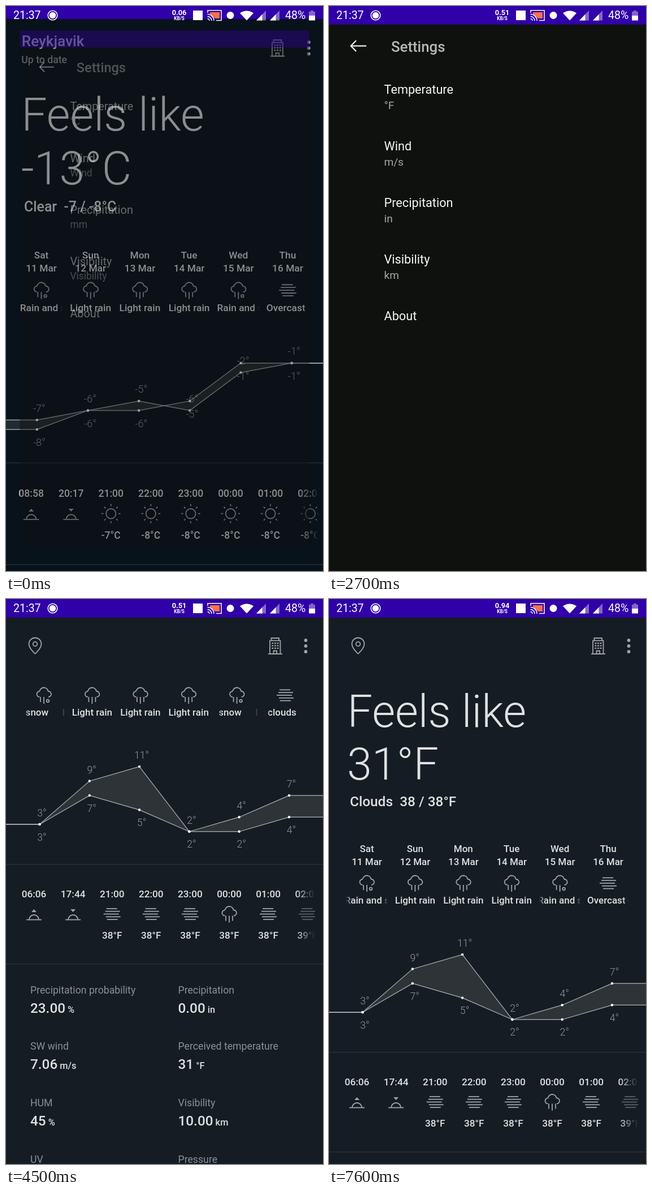
An HTML page with a canvas for the animation above (7700 ms loop, 561 by 998 pixels).

```html
<!DOCTYPE html>
<html lang="en">
<head>
<meta charset="utf-8">
<title>Weather settings</title>
<style>
html, body { margin: 0; width: 100%; height: 100%; overflow: hidden; background: #151c23; }
canvas { display: block; width: 561px; height: 998px; }
</style>
</head>
<body>
<canvas id="stage"></canvas>
<script>
const W = 561, H = 998, LOOP = 7700, STEP = 100, BAR = 32.75;
const CLOSE = 2900, MARQUEE_START = 2770, MARQUEE_SPEED = 0.038, MARQUEE_PAUSE = 1200;
const FONT = 'Roboto, "Open Sans", sans-serif';
const BRIGHT = '#dfe1e1', SOFT = '#8b9093', ICON = '#a0a4a6', PURPLE = '#3000a8';
const TAU = Math.PI * 2;

const canvas = document.getElementById('stage');
const dpr = window.devicePixelRatio || 1;
canvas.width = W * dpr;
canvas.height = H * dpr;
const c = canvas.getContext('2d');

const scrollKeys = [[3700, 0], [4400, 332], [4600, 332], [4800, 391], [6500, 391], [7200, 0]];
const glowKeys = [[4800, 0], [5200, 1], [5700, 1], [5900, 0.86], [6400, 0]];
const speedKeys = [[0, '0.06'], [1500, '0.63'], [2700, '0.51'], [5200, '0.94']];

// Each row: title, value before, value after, press time, change time
const prefs = [
  ['Temperature', '°C', '°F', 400, 700],
  ['Wind', 'Wind', 'm/s', 1200, 1500],
  ['Precipitation', 'mm', 'in', 1800, 2100],
  ['Visibility', 'Visibility', 'km', 2300, 2600],
  ['About']
];

const days = [
  ['Sat', 'snow', 'Rain and snow'], ['Sun', 'rain', 'Light rain'], ['Mon', 'rain', 'Light rain'],
  ['Tue', 'rain', 'Light rain'], ['Wed', 'snow', 'Rain and snow'], ['Thu', 'fog', 'Overcast clouds']
];

const before = {
  bg: '#08121b', city: 'Reykjavik', feels: '-13°C', sky: 'Clear', range: '-7 / -8°C',
  high: [-7, -6, -5, -6, -2, -1], low: [-8, -6, -6, -5, -1, -1],
  sun: ['08:58', '20:17'],
  icons: ['sun', 'sun', 'sun', 'sun', 'sun', 'sun'],
  temps: ['-7°C', '-8°C', '-8°C', '-8°C', '-8°C', '-8°C']
};
const after = {
  bg: '#151c23', feels: '31°F', sky: 'Clouds', range: '38 / 38°F',
  high: [3, 9, 11, 2, 4, 7], low: [3, 7, 5, 2, 2, 4],
  sun: ['06:06', '17:44'],
  icons: ['fog', 'fog', 'fog', 'rain', 'fog', 'fog'],
  temps: ['38°F', '38°F', '38°F', '38°F', '38°F', '39°F']
};
const hours = ['21:00', '22:00', '23:00', '00:00', '01:00', '02:00'];
const details = [
  ['Precipitation probability', '23.00', '%'], ['Precipitation', '0.00', 'in'],
  ['SW wind', '7.06', 'm/s'], ['Perceived temperature', '31', '°F'],
  ['HUM', '45', '%'], ['Visibility', '10.00', 'km'],
  ['UV', '2.03', ''], ['Pressure', '1015.00', 'hPa']
];

function tween(keys, t) {
  if (t <= keys[0][0]) return keys[0][1];
  for (let i = 1; i < keys.length; i++) {
    const [t0, a] = keys[i - 1], [t1, b] = keys[i];
    if (t < t1) {
      const p = (t - t0) / (t1 - t0);
      return a + (b - a) * p * p * (3 - 2 * p);
    }
  }
  return keys[keys.length - 1][1];
}

function text(str, x, y, size, weight, color, align = 'left') {
  c.font = `${weight} ${size}px ${FONT}`;
  c.textAlign = align;
  c.fillStyle = color;
  c.fillText(str, x, y);
}

function line(...p) {
  c.beginPath();
  for (let i = 0; i < p.length; i += 2) c.lineTo(p[i], p[i + 1]);
  c.stroke();
}

function shape(color, ...p) {
  c.fillStyle = color;
  c.beginPath();
  for (let i = 0; i < p.length; i += 2) c.lineTo(p[i], p[i + 1]);
  c.fill();
}

function rect(color, x, y, w, h) {
  c.fillStyle = color;
  c.fillRect(x, y, w, h);
}

function circle(x, y, r, color) {
  c.beginPath();
  c.arc(x, y, r, 0, TAU);
  if (color) { c.fillStyle = color; c.fill(); } else c.stroke();
}

function pen(color, width) {
  c.strokeStyle = color;
  c.lineWidth = width;
}

function fade(x0, x1, stops) {
  const g = c.createLinearGradient(x0, 0, x1, 0);
  stops.forEach(([p, a]) => g.addColorStop(p, `rgba(223,225,225,${a})`));
  return g;
}

function scaled(s, alpha, draw) {
  c.save();
  c.globalAlpha = alpha;
  c.translate(W / 2, H / 2);
  c.scale(s, s);
  c.translate(-W / 2, -H / 2);
  draw();
  c.restore();
}

const icons = {
  cloud() {
    c.beginPath();
    c.arc(-7.5, -2, 5, Math.PI / 2, 4.6);
    c.arc(0, -6, 7.5, 3.5, -0.2);
    c.arc(8, -2, 5, -1.5, Math.PI / 2);
    c.stroke();
    line(-6, 3, -6, 12);
    line(0, 3, 0, 15);
  },
  rain() {
    icons.cloud();
    line(6, 3, 6, 12);
  },
  snow() {
    icons.cloud();
    circle(7, 10, 2.3);
  },
  fog() {
    [[-10, 9], [-12, 14], [-15, 12], [-11, 15], [-9, 10]].forEach(([a, b], i) => {
      const y = (i - 2) * 4.8;
      line(a, y, b, y);
    });
  },
  sun() {
    circle(0, 0, 8.5);
    for (let i = 0; i < 8; i++) {
      const x = Math.cos(i * TAU / 8), y = Math.sin(i * TAU / 8);
      line(x * 13, y * 13, x * 16.5, y * 16.5);
    }
  },
  horizon(dir) {
    line(-13.5, 10, 13.5, 10);
    c.beginPath();
    c.arc(0, 10, 8.5, Math.PI, 0);
    c.stroke();
    shape(c.strokeStyle, -4.5, -6 + dir * 2.5, 4.5, -6 + dir * 2.5, 0, -6 - dir * 2.5);
  },
  rise() { icons.horizon(1); },
  set() { icons.horizon(-1); }
};

function icon(name, x, y, alpha = 1) {
  c.save();
  c.globalAlpha *= alpha;
  c.translate(x, y);
  pen(ICON, 1.8);
  icons[name]();
  c.restore();
}

function marquee(str, cx, y, t) {
  const width = 74, left = cx - width / 2;
  c.font = `500 17px ${FONT}`;
  const len = c.measureText(str).width;
  if (len < width + 3) return text(str, cx, y, 17, 500, BRIGHT, 'center');
  const period = len + width / 3;
  const run = period / MARQUEE_SPEED;
  const phase = t < MARQUEE_START ? run : (t - MARQUEE_START) % (run + MARQUEE_PAUSE);
  const shift = phase < run ? phase * MARQUEE_SPEED : 0;
  const paint = fade(left, left + width, [[0, shift ? 0 : 1], [0.14, 1], [0.86, 1], [1, 0]]);
  c.save();
  c.beginPath();
  c.rect(left, y - 20, width, 30);
  c.clip();
  text(str, left - shift, y, 17, 500, paint);
  text(str, left - shift + period, y, 17, 500, paint);
  c.restore();
}

function chart(data) {
  const all = [...data.high, ...data.low];
  const top = Math.max(...all), unit = 114.8 / (top - Math.min(...all));
  const px = i => 59.5 + i * 88.3;
  const py = v => 628 + (top - v) * unit;
  const path = vals => {
    const pts = [-40, py(vals[0])];
    vals.forEach((v, i) => pts.push(px(i), py(v)));
    return [...pts, W + 40, py(vals[5])];
  };
  const low = path(data.low), back = [];
  for (let i = low.length - 2; i >= 0; i -= 2) back.push(low[i], low[i + 1]);
  shape('rgba(255,250,220,0.1)', ...path(data.high), ...back);
  pen('rgba(190,193,194,0.78)', 1.4);
  line(...path(data.high));
  line(...low);
  [[data.high, -14], [data.low, 28.5]].forEach(([vals, dy]) => vals.forEach((v, i) => {
    circle(px(i), py(v), 2.2, '#fff');
    text(v + '°', px(i) + 4, py(v) + dy, 17.7, 300, '#94999b', 'center');
  }));
}

function hourly(data) {
  const paint = fade(512, 547, [[0, 1], [1, 0]]);
  const times = [...data.sun, ...hours];
  const marks = ['rise', 'set', ...data.icons];
  c.save();
  c.beginPath();
  c.rect(0, 830, 547, 120);
  c.clip();
  times.forEach((time, i) => {
    const x = 49.5 + i * 69.1;
    text(time, x, 859, 17.2, 500, paint, 'center');
    icon(marks[i], x, 888.5, i === 7 ? 0.5 : 1);
    if (i > 1) text(data.temps[i - 2], x, 932, 17.2, 500, paint, 'center');
  });
  c.restore();
}

function detailGrid() {
  details.forEach(([label, value, unit], i) => {
    const x = i % 2 ? 304.5 : 43;
    const y = 1028.5 + (i >> 1) * 99.8;
    text(label, x, y, 17.7, 400, SOFT);
    text(value, x, y + 34, 24.3, 500, BRIGHT);
    text(' ' + unit, x + c.measureText(value).width, y + 34, 16.4, 500, BRIGHT);
  });
}

function header(data) {
  pen(ICON, 1.8);
  if (data.city) {
    text(data.city, 33, 80, 25.7, 500, BRIGHT);
    text('Up to date', 32.5, 109, 17.3, 500, SOFT);
  } else {
    c.beginPath();
    c.moveTo(51.5, 97);
    c.bezierCurveTo(45, 90, 40.5, 85, 40.5, 79.5);
    c.arc(51.5, 79.5, 11, Math.PI, 0);
    c.bezierCurveTo(62.5, 85, 58, 90, 51.5, 97);
    c.stroke();
    circle(51.5, 79.5, 3.8);
  }
  c.strokeRect(467, 73.5, 18.5, 23.5);
  line(469.5, 73, 469.5, 69, 483, 69, 483, 73);
  line(464, 97, 489, 97);
  line(473.5, 97, 473.5, 91.5, 479, 91.5, 479, 97);
  for (let i = 0; i < 9; i++) rect(ICON, 470.3 + (i % 3) * 4.6, 77 + Math.floor(i / 3) * 4.4, 3, 2.2);
  [73, 83, 93].forEach(y => circle(530.5, y, 2.9, ICON));
}

function glow(amount) {
  if (!amount) return;
  const r = 1045, apex = H - 67 * amount;
  c.beginPath();
  c.arc(390, apex + r, r, 0, TAU);
  c.fillStyle = `rgba(187,134,252,${0.15 * amount})`;
  c.fill();
}

function weather(data, t) {
  rect(data.bg, -60, -60, W + 120, H + 120);
  c.save();
  c.beginPath();
  c.rect(-60, 141, W + 120, H);
  c.clip();
  c.translate(0, -tween(scrollKeys, t));
  text('Feels like', 32.5, 226, 79, 300, BRIGHT);
  text(data.feels, 32, 318.6, 79, 300, BRIGHT);
  text(data.sky, 37, 366, 24.4, 500, BRIGHT);
  text(data.range, 37 + c.measureText(data.sky + '  ').width, 366, 24.4, 500, BRIGHT);
  days.forEach(([name, mark, label], i) => {
    const x = 67 + i * 85.4;
    text(name, x, 447, 17, 500, BRIGHT, 'center');
    text(`${11 + i} Mar`, x, 469.5, 17, 500, BRIGHT, 'center');
    icon(mark, x, 502);
    marquee(label, x, 538, t);
  });
  chart(data);
  rect('#2b3238', -60, 800, W + 120, 1.3);
  hourly(data);
  rect('#2b3238', -60, 976, W + 120, 1.3);
  detailGrid();
  c.restore();
  header(data);
  rect(PURPLE, -60, -60, W + 120, 60 + BAR);
  glow(tween(glowKeys, t));
}

function settings(t) {
  rect('#0f110f', 0, 0, W, H);
  rect(PURPLE, 0, 0, W, BAR);
  pen('#f2f3f2', 2.2);
  line(66, 70.5, 39, 70.5);
  line(48, 61, 38.7, 70.5, 48, 80);
  text('Settings', 110, 81, 25.8, 500, '#b6b9b6');
  prefs.forEach(([title, off, on, press, change], i) => {
    const y = 154.5 + i * 100;
    if (t >= press && t < change) rect('#3e403e', 0, 109 + i * 100, W, 100);
    text(title, 97.5, y, 21.7, 400, '#f5f6f5');
    if (off) text(t < change ? off : on, 97.5, y + 27.5, 19.1, 400, '#a6a9a6');
  });
}

function statusBar(t) {
  const white = '#fff', dim = 'rgba(255,255,255,0.4)';
  text('21:37', 13, 23, 19.5, 400, white);
  pen(white, 1.5);
  circle(82.5, 16.5, 8.3);
  circle(82.5, 16.5, 5.8, white);
  const speed = speedKeys.filter(k => k[0] <= t).pop()[1];
  text(speed, 306.5, 16, 12.8, 700, white, 'center');
  text('KB/S', 306.5, 25, 8.2, 700, white, 'center');
  rect(white, 331, 8, 17, 17);
  // Screen cast
  line(357, 12, 357, 7.8, 381, 7.8, 381, 25.5, 372, 25.5);
  shape('#f4714f', 361, 11, 378, 11, 378, 22, 370, 22, 361, 14);
  [3.5, 7.5, 11.5].forEach(r => {
    c.beginPath();
    c.arc(356.5, 26, r, -Math.PI / 2, 0);
    c.stroke();
  });
  circle(397, 16.5, 6.5, white);
  // Wi-Fi
  c.beginPath();
  c.moveTo(426, 25.5);
  c.lineTo(414, 12.5);
  c.quadraticCurveTo(426, 4.5, 438, 12.5);
  c.fillStyle = white;
  c.fill();
  [443, 467].forEach(x => {
    shape(dim, x, 25.5, x + 17, 25.5, x + 17, 8);
    shape(white, x, 25.5, x + 10.5, 25.5, x + 10.5, 14.7);
  });
  text('48%', 494, 23, 19.5, 400, white);
  rect(dim, 539, 8, 5, 2);
  rect(dim, 536, 10, 11, 7);
  rect(white, 536, 17, 11, 8.5);
}

function draw(t) {
  c.setTransform(dpr, 0, 0, dpr, 0, 0);
  rect('#000', 0, 0, W, H);
  if (t < CLOSE) {
    const rest = Math.exp(-t / 110);
    const alpha = Math.min(1, 0.4 + t / 150);
    if (t < 900) scaled(1.15 - 0.129 * rest, 1, () => weather(before, t));
    scaled(t < 900 ? 1 - 0.087 * rest : 1, alpha, () => settings(t));
  } else {
    const u = t - CLOSE;
    const rest = u < 600 ? Math.exp(-u / 110) : 0;
    scaled(1 + 0.1 * rest, 1, () => weather(after, t));
    if (u < 150) scaled(0.9 + 0.1 * rest, 1 - u / 150, () => settings(t));
  }
  statusBar(t);
}

const start = performance.now();
function tick() {
  const t = (performance.now() - start) % LOOP;
  draw(Math.floor(t / STEP) * STEP);
  requestAnimationFrame(tick);
}
tick();
</script>
</body>
</html>
```
